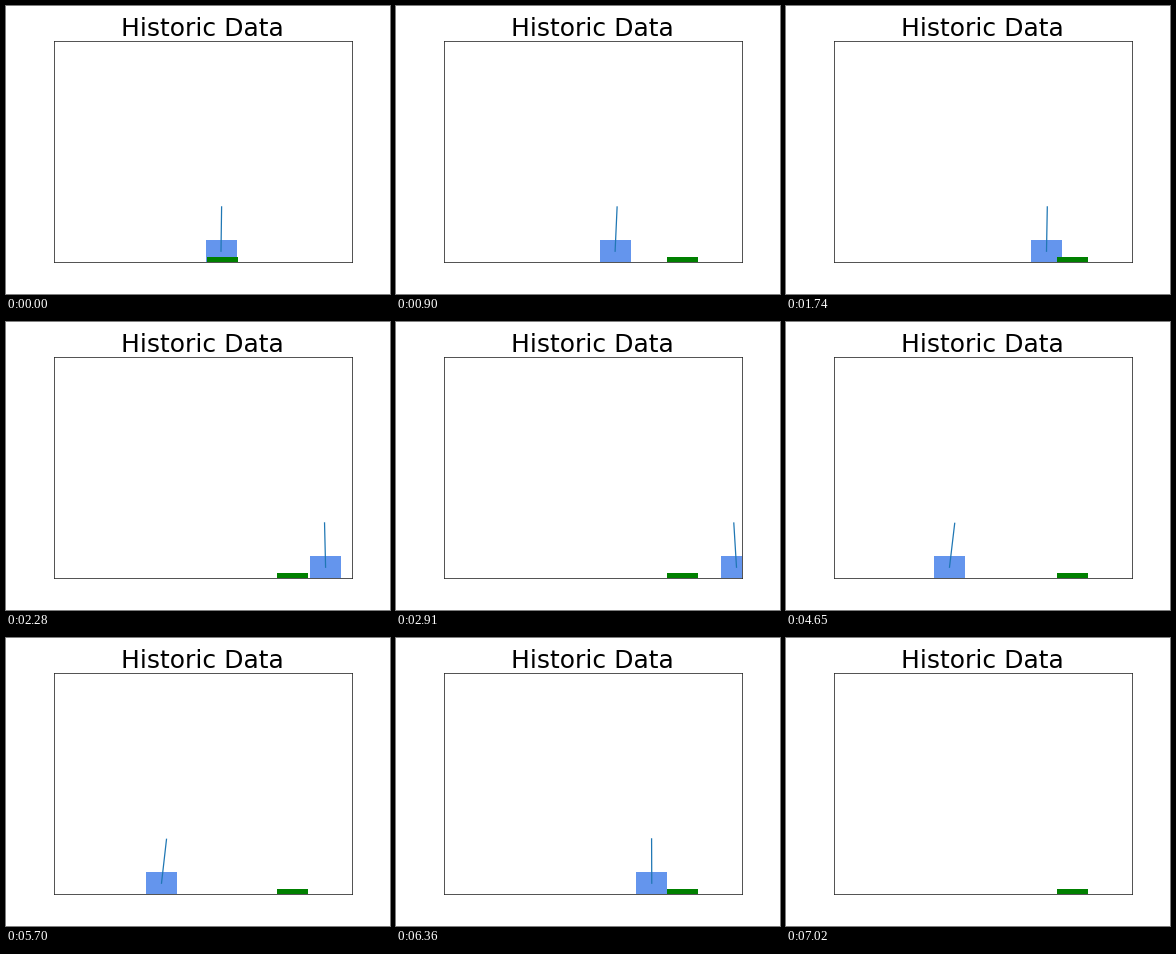
A matplotlib script that plays this animation: 384x288 px, repeating every 8 s.

```python
import numpy as np
import matplotlib.pyplot as plt
from matplotlib.animation import FuncAnimation
from matplotlib.patches import Rectangle

LOOP_MS, TICK_MS, STEP_MS = 8000, 10, 30
LAST_STEP = 234
PX_PER_UNIT = 62
CENTER_PX = 196.8
CART_W, CART_H = 0.5, 0.3
POLE_LEN = 0.6
GOAL_START, GOAL = 0.31, 1.45

# (step, cart centre in px) and (step, sideways pole lean in px)
CART_KEYS = [(0, 215), (12, 204.7), (27, 216.5), (54, 246.5), (58, 260.5),
             (81, 329), (95, 341), (97, 340.5), (108, 332), (133, 264.5),
             (135, 250.5), (155, 163.5), (162, 148.7), (174, 111.5),
             (189, 150.5), (190, 155.5), (216, 274.5), (234, 364)]
LEAN_KEYS = [(0, 0.6), (30, 2), (58, 0.8), (97, -2.7), (133, -0.7),
             (155, 5.2), (172, 6.4), (190, 5), (211, 0), (234, -3)]


def smooth_path(keys, t):
    """Cubic Hermite curve whose turning points lie on the keys."""
    x, y = np.array(keys, float).T
    h = np.diff(x)
    d = np.diff(y) / h
    slope = np.concatenate([d[:1], np.zeros(len(x) - 2), d[-1:]])
    for i in range(1, len(x) - 1):
        if d[i - 1] * d[i] > 0:
            a, b = 2 * h[i] + h[i - 1], h[i] + 2 * h[i - 1]
            slope[i] = (a + b) / (a / d[i - 1] + b / d[i])
    k = np.clip(np.searchsorted(x, t, side="right") - 1, 0, len(h) - 1)
    u, hk = (t - x[k]) / h[k], h[k]
    return (y[k] * (1 + 2 * u) * (1 - u) ** 2
            + hk * slope[k] * u * (1 - u) ** 2
            + y[k + 1] * u ** 2 * (3 - 2 * u)
            + hk * slope[k + 1] * u ** 2 * (u - 1))


steps = np.arange(LAST_STEP + 1)
cart_x = (smooth_path(CART_KEYS, steps) - CENTER_PX) / PX_PER_UNIT
angle = np.arcsin(smooth_path(LEAN_KEYS, steps) / (POLE_LEN * PX_PER_UNIT))

fig = plt.figure(figsize=(6.4, 4.8), dpi=60)
ax = fig.add_subplot()
ax.set(xlim=(-2.4, 2.4), ylim=(0, 3), xticks=[], yticks=[])
ax.set_title("Historic Data", fontsize=30, fontname="DejaVu Sans")

cart = ax.add_patch(Rectangle((0, 0), CART_W, CART_H,
                              color="cornflowerblue", lw=0))
goal = ax.add_patch(Rectangle((0, 0), CART_W, 0.07, color="green", lw=0))
pole, = ax.plot([], [], color="tab:blue", lw=1.5)


def update(frame):
    step = min(frame * TICK_MS // STEP_MS, LAST_STEP)
    x, theta = cart_x[step], angle[step]
    cart.set_x(x - CART_W / 2)
    goal.set_x((GOAL if step else GOAL_START) - CART_W / 2)
    pole.set_data([x, x + POLE_LEN * np.sin(theta)],
                  [CART_H / 2, CART_H / 2 + POLE_LEN * np.cos(theta)])
    return cart, goal, pole


anim = FuncAnimation(fig, update, frames=LOOP_MS // TICK_MS,
                     init_func=lambda: update(0), interval=TICK_MS,
                     repeat=True, repeat_delay=0)
plt.show()
```
